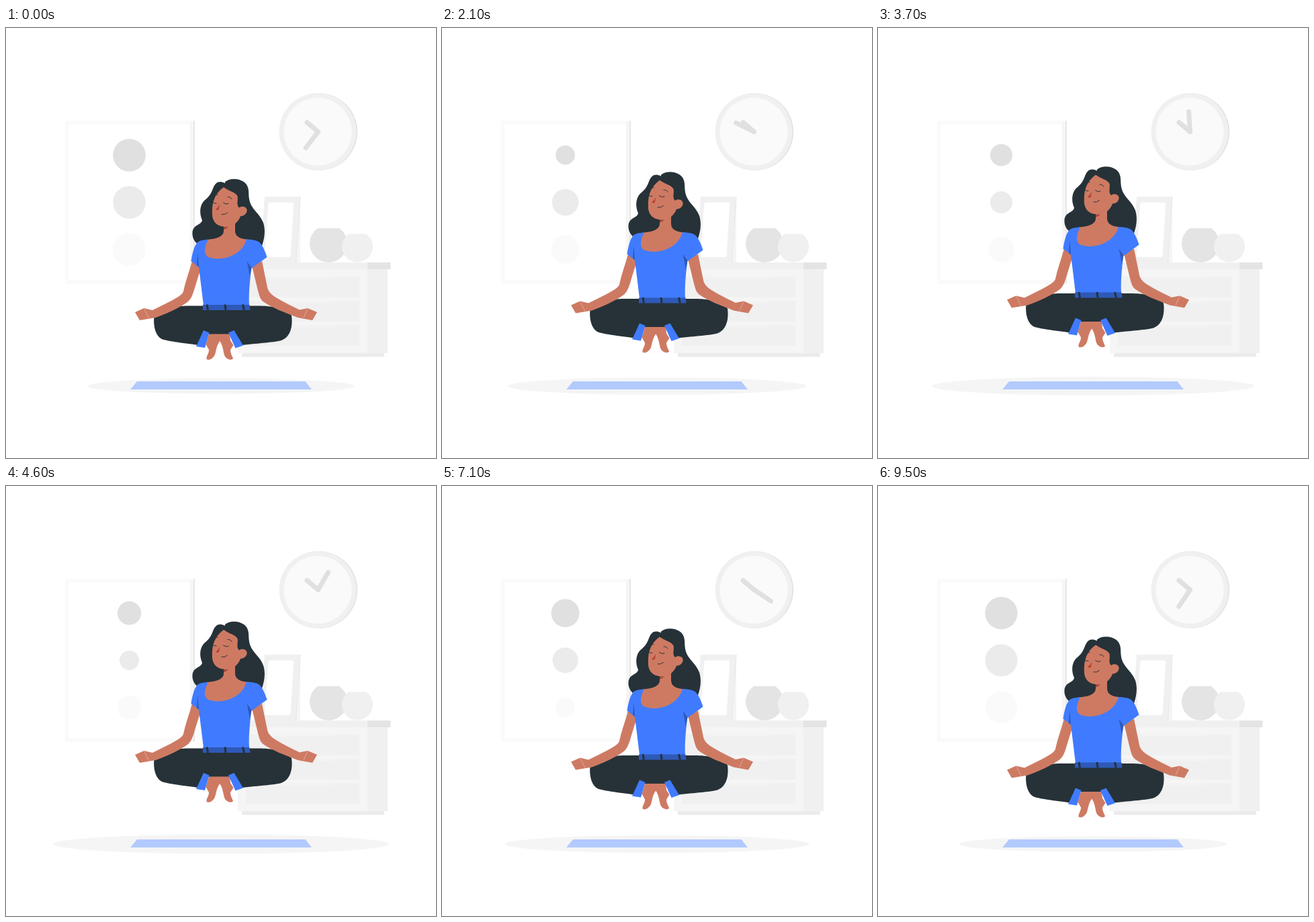
An HTML page for the animation above (9.6 s loop, 640 by 640 pixels).

```html
<!DOCTYPE html>
<html lang="en">
<head>
<meta charset="utf-8">
<title>Levitating meditation</title>
<style>
  html, body { margin: 0; width: 100%; height: 100%; overflow: hidden; background: #fff; }
  svg { display: block; width: 100vw; height: 100vh; }
  .skin { fill: #ce7a63; }
  .dark { fill: #263238; }
  .blue { fill: #407bff; }
  .shade { fill: #2e59b8; }
  .line { fill: none; stroke: #263238; stroke-width: 1; stroke-linecap: round; }
  .hand { stroke: #e0e0e0; stroke-width: 7; stroke-linecap: round; }
</style>
</head>
<body>
<svg viewBox="0 0 640 640">
  <g id="picture">
    <path fill="#e6e6e6" d="M278 138h3v242l-3 1z"/>
    <path fill="#fafafa" d="M88 138h191v243H88z"/>
    <path fill="#f5f5f5" d="M274 140h5v241h-5z"/>
    <path fill="#fff" d="M93.500 143.500H274V375.500H93.500z"/>
    <circle class="dot" cx="183.500" cy="189.200" fill="#e0e0e0"/>
    <circle class="dot" cx="183.500" cy="259.500" fill="#ebebeb"/>
    <circle class="dot" cx="183.500" cy="329.500" fill="#fafafa"/>
  </g>

  <g id="clock">
    <circle cx="465.500" cy="154.500" r="57.500" fill="#e0e0e0"/>
    <circle cx="464" cy="154.500" r="57.500" fill="#f0f0f0"/>
    <circle cx="464" cy="154.300" r="50.500" fill="#fafafa"/>
    <path class="hand" d="M464.500 154.500L448 140.500"/>
    <path class="hand" id="minute" d="M464.500 154.500V124.500"/>
  </g>

  <g id="dresser">
    <path fill="#f5f5f5" d="M438 251v98h-8z"/>
    <path fill="#f0f0f0" d="M385 251h53.500L432 349h-54z"/>
    <path fill="none" stroke="#e8e8e8" d="M438 251.500L431.500 349"/>
    <path fill="#fff" d="M393 259.500h33q2.500 0 2.300 2.500l-4.800 76.500q-.2 2.500-2.700 2.500H387q-2.500 0-2.300-2.500l5.600-76.500q.2-2.500 2.700-2.500z"/>
    <path fill="#e4e4e4" d="M464 298h32a28 28 0 1 1-32 0z"/>
    <path fill="#f0f0f0" d="M510 306.500h26a23 23 0 1 1-26 0z"/>
    <path fill="#f5f5f5" d="M345 359h193v125H345z"/>
    <path fill="#f0f0f0" d="M538 359h30v125h-30zM341 349h197v10H341z"/>
    <path fill="#e4e4e4" d="M538 349h34.500v10H538z"/>
    <path fill="#ebebeb" d="M351 484h211.500v5.500H351z"/>
    <path fill="#f0f0f0" d="M357 370h169v31H357zM357 406h169v31H357zM357 442h169v31H357z"/>
    <path fill="#f3f3f3" d="M395 370h93v3.500h-93zM395 406h93v3.500h-93zM395 442h93v3.500h-93z"/>
  </g>

  <ellipse id="shadow" cx="320" cy="533" fill="#f5f5f5"/>
  <path fill="#b3caff" d="M195 526H445.500L455 538H185z"/>

  <g id="woman">
    <path class="dark" d="M326 229C333 223 346 223.500 354 229C362 235 361 243 361.500 251C363 270 377 274 383 290C387 303 384 315 381 324H290C279 320 276 309 278 301C281 292 291 293 292 286C287 275 289 263 295 257C302 251 304 249 308 239C312 229 317 227 326 231Z"/>

    <path class="dark" d="M293 413.500H268C246 414 224 422 220.500 429C219 443 222 457 231 462.500C238 466 265 469 286 472L296 456H338L351 472C376 469 401 468 411 464.500C424 459 427 443 425 428C417 418 398 414 380 413.500Z"/>
    <path class="skin" d="M302 455.500H333L334 465L338.500 472L334 479C334 485 337 488 338 492C335 496 328 492 326 489C323 483 324 475 318.200 466C312 475 313 483 310 488C306 494 300 495 298.500 492.500C298 488 302 485 302 479L297.500 471Z"/>
    <path class="blue" d="M294 450L302.500 453.500L296 476L283 474ZM331 453.500L339.500 450L353 472.500L341.500 476.500Z"/>

    <path class="skin" d="M277 347C273 362 267 377 264 392C262 399 248 405 218 420L205.500 417L192 423L199 435L223 431C240 425 257 417 270 408C275 404 277 399 279 393L288 364V350Z"/>
    <path class="skin" d="M381 347L389 386C391 396 401 402 437 419.500L449 417L463 423L456 435L434 431C414 423 397 417 384 408C378 404 377 398 375 391L366 354Z"/>
    <path fill="none" stroke="#e6b3a4" stroke-width=".8" d="M205.500 417.500L213 432M449 417.500L443 431"/>

    <path class="skin" d="M324 290V302Q324 313 300 315L291 330L300 350H350L362 315Q341 314 341 302V285Z"/>
    <path class="blue" d="M301 314.500C296 325 293 336 301 341C319 348 351 340 358 314.500C371 315 376 317 379 321C383 326 386 333 388.500 341L365 358C363 378 361 394 362 413H294L287 356L275.500 347C277 336 280 325 284 320C287 316 293 316 301 314.500Z"/>
    <path class="shade" d="M285.500 334L284 353L287 356ZM358.500 347L365.500 357L363 370Z"/>
    <path class="shade" d="M293 412H362.500L363.500 420H293Z"/>
    <path stroke="#263238" stroke-width="3" d="M299 411.500l1.500 8.500M326 411.500l1 8.500M352.500 411.500l1.800 8.500"/>

    <path fill="#9b4b3a" d="M324 294L333 293Q329 299 324 300Z"/>
    <path class="skin" d="M324 237C332 243 341 244 344.500 250C346 257 342 262 347 267.500C350 264.500 357 265 358.500 270C359.500 276 354 280 349 280C346 289 337 297 326 296C313 295 308 288 307 279C306 262 309 248 324 237Z"/>
    <path fill="#b8412f" d="M318 262Q316 267 312 270Q315 272 317 270Z"/>
    <path class="line" d="M323.500 260Q327 263.500 331 261.500M308 259.500Q310 261.500 313 261M330 251.500Q334 251 336 254.500M310.500 249.500Q312 247.500 315 248M321 277.500Q326 278.500 329.500 275"/>
  </g>
</svg>
<script>
  const LOOP = 9600, STEP = 100;
  const get = id => document.getElementById(id);
  const dots = document.querySelectorAll('.dot');
  const turns = [0.2, 0.5, 0.76];

  // Linear rise from 0 to 1 at the given phase, then linear return.
  const ramp = (p, peak) => p < peak ? p / peak : (1 - p) / (1 - peak);

  function draw(now) {
    const p = Math.floor(now % LOOP / STEP) * STEP / LOOP;
    const lift = ramp(p, 0.5);
    get('woman').setAttribute('transform', `translate(0 ${-24 * lift})`);
    get('shadow').setAttribute('rx', 198.5 + 54 * lift);
    get('shadow').setAttribute('ry', 11.5 + 3.1 * lift);
    get('minute').setAttribute('transform', `rotate(${217.6 + 360 * p} 464.5 154.5)`);
    dots.forEach((dot, i) => dot.setAttribute('r', 24.3 - 10.2 * ramp(p, turns[i])));
  }

  const start = performance.now();
  function tick() {
    draw(performance.now() - start);
    requestAnimationFrame(tick);
  }
  tick();
</script>
</body>
</html>
```
